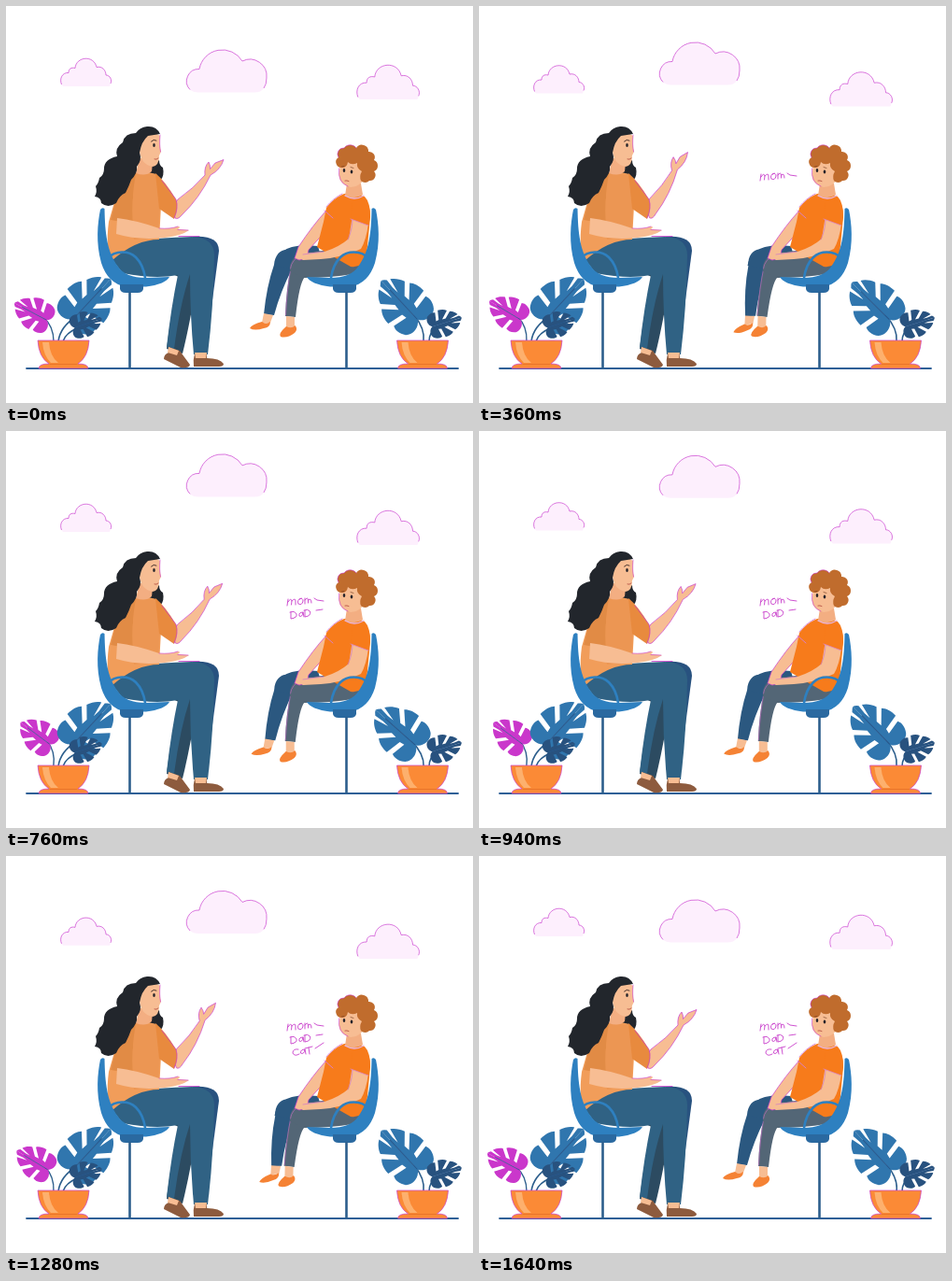
An HTML page that plays this animation: 500x425 px, repeating every 1.66 s.

```html
<!DOCTYPE html>
<html lang="en">
<head>
<meta charset="utf-8">
<title>Conversation</title>
<style>
html, body { margin: 0; width: 100%; height: 100%; overflow: hidden; background: #fff; }
svg { display: block; width: 100%; height: 100%; }
.edge { stroke: #cb3fd0; stroke-width: .7; vector-effect: non-scaling-stroke; }
.line { fill: none; stroke-linecap: round; stroke-linejoin: round; }
.ink { stroke: #c93fcb; stroke-width: .9; }
</style>
</head>
<body>
<svg id="stage" viewBox="0 0 500 425"></svg>
<script>
const LOOP = 1660;
const C = {
  skin: '#f7bd93', hair: '#22262c', curl: '#c06c2d', shirt: '#f19d5a', back: '#e18b45', panel: '#ec9653',
  sleeve: '#e88a3e', tee: '#f77b1b', jeans: '#306284', slate: '#2c4b61', navy: '#2b5880', grey: '#536676',
  chair: '#2e80c0', seat: '#2a69a0', pole: '#2c5e8c', leaf: '#3076ae', dark: '#28527f',
  pink: '#ca37cb', pot: '#fb8a36', glow: '#fdb06d', cloud: '#fdeffd', shoe: '#8d5b3e', foot: '#f58234'
};

const shape = (d, fill, cls = '') => `<path d="${d}" fill="${fill}" class="${cls}"/>`;
const line = (d, color, w = 1) => `<path d="${d}" class="line" stroke="${color}" stroke-width="${w}"/>`;
const dot = (x, y) => `<ellipse cx="${x}" cy="${y}" rx="1.300" ry="1.900" fill="#25242b"/>`;
const group = (id, body) => `<g id="${id}">${body}</g>`;
const place = (tf, body) => `<g transform="${tf}">${body}</g>`;

// --- scenery ---
const BIG = 'M197 89.5A13 13 0 0 1 207 67.500A25 25 0 0 1 253 59A18 18 0 0 1 279 77Q279 84 276 88';
const SMALL = 'M1.500 28C-1 22 2 15 9 15.500C9 11 12 9.500 16 10.500C17 -2 36 -4 39 9.500C45 8 49 13 49 18C53 18 56 23 54 27';
const bigCloud = shape(BIG + 'Q273 92.5 266 92.5H206Q200 92.5 197 89.5Z', C.cloud) + shape(BIG, 'none', 'edge');
const smallCloud = (x, y, s) => place(`translate(${x} ${y}) scale(${s})`,
  shape(SMALL + 'L53 30H3Z', C.cloud) + shape(SMALL, 'none', 'edge'));

const HALF = 'M0 2C8 16 28 18 38 8C46 -2 47 -14 43 -21L14 -16L16 -26L48 -32C48 -46 44 -56 38 -62L14 -38L13 -50L33 -71C29 -82 22 -90 15 -94L8 -64L7 -78L9 -97Q4 -103 0 -104Z';
const leaf = (x, y, angle, s, color) => place(`translate(${x} ${y}) rotate(${angle}) scale(${s})`,
  shape(HALF, color) + place('scale(-1 1)', shape(HALF, color)) + line('M0 0V-78', '#28568a', 1.8));

const pot = x => place(`translate(${x} 0)`,
  shape('M0 358H55Q54 376 43 383Q54 383 54 388H1Q1 383 12 383Q1 376 0 358Z', C.pot, 'edge') +
  shape('M5 360H12Q13 375 22 382H14Q6 374 5 360Z', C.glow) +
  line('M13 383.500H42', '#e9742a', 1));

const chair =
  shape('M101 218Q103 215 105.500 217C106 243 108 263 120 279Q128 291 150 291L175 290Q170 298 150 300.500H128Q109 297 102 275C96 253 98 233 101 218Z', C.chair) +
  shape('M122 298H147V303Q146 307 141 307H128Q123 307 122 303Z', C.seat) +
  line('M109 270C117 261 132 262 139 269Q147 277 149 291', C.chair, 2.6) +
  line('M132.500 307V387', C.pole, 2.6);

// --- woman ---
const forearm = shape('M181 227Q177 215 184 207Q201 195 213 181Q212 172 217 167Q219 171 218.500 174.500L224 168L233 164.500Q230 175 219 181Q207 206 188 224Q184 229 181 227Z', C.skin, 'edge');

const woman =
  shape('M154 171L164 165Q164 171 168 173Q170 182 165 187Q158 186 152 179Z', C.hair) +
  shape('M200 247Q228 245 228 262L219 330L208 352L196 300Z', C.dark) +
  shape('M150 275L200 280L205 290Q197 340 189 372L172 367Q178 320 185 290Z', C.slate) +
  shape('M128 252Q165 248 199 247Q223 248 223 267Q222 325 216 373H201Q197 330 197 287Q186 320 180 367L172 365Q177 321 184 288Q160 293 125 286L114 272Z', C.jeans) +
  line('M185 246.500H207', C.pink, .8) +
  shape('M174 365L186 369Q191 376 197 384Q196 388 187 387L169 378Q169 373 174 371Z', C.shoe) +
  shape('M174 365L185 369L183 374L173 371Z', C.skin) +
  shape('M202 372H215V377Q229 377 233 383Q233 386 228 386H201Q200 379 202 372Z', C.shoe) +
  shape('M202 371H215L214 377H203Z', C.skin) +
  shape('M124 182Q143 174 161 180L167 196L164 250Q139 250 114 272Q106 262 110 231Z', C.shirt) +
  shape('M124 182L140 179Q134 205 136 233L112 229Z', C.back) +
  shape('M139 179L161 180Q166 191 165 213L163 247L137 250Q133 210 139 179Z', C.panel) +
  shape('M160 179Q170 187 182 207Q185 216 180 228L164 217Z', C.sleeve) +
  line('M167 187L182 207Q185 216 180 227', C.pink, .7) +
  shape('M143 162L157 168L156 177Q150 183 139 179Z', '#f3ae82') +
  shape('M144 140Q158 133 165 139Q164 149 166 156L164 160Q164 171 157 172Q145 170 143 156Z', C.skin) +
  shape('M165 137Q161 128 151 129Q143 130 139 136Q127 136 125 146Q116 152 119 161Q105 164 105 174Q105 181 100 184Q99 190 96 193Q98 199 95 204Q102 205 102 211Q109 217 118 211Q121 203 128 200Q132 192 134 186Q141 179 140 172Q146 165 143 157Q145 145 152 139Z', C.hair) +
  line('M165 138Q164 149 165.500 156', C.pink, .6) +
  dot(158.5, 149) +
  line('M155.500 145Q158 142 161 144', '#3a2926', .9) +
  line('M159 164Q161 165 163 163', '#b75345', .9) +
  shape('M119 227Q138 229 164 238Q176 239 184 236Q188 236 184 239L196 240Q188 246 170 248Q141 251 118 244Z', C.skin) +
  line('M164 238Q176 239 184 236M184 239.500L195 240', C.pink, .6);

// --- boy ---
const backShin = shape('M287 277C288 262 300 257 308 264Q311 270 307 280Q294 305 287 331L276 330Q279 300 287 277Z', C.navy) +
  shape('M276 329L286 331L283 339H274Z', C.skin) +
  shape('M274 338Q278 341 283 338Q283 344 276 345Q266 348 261 345Q263 341 274 338Z', C.foot);
const frontShin = shape('M305 280Q309 267 325 272L320 290Q314 296 310 333L299 332Q300 302 305 280Z', C.grey) +
  line('M305 280Q301 302 299.500 331', '#b66cbc', .7) +
  shape('M300 332L309 333V345H300Z', C.skin) +
  shape('M300 343Q306 346 309.500 342Q313 346 309 350Q301 356 294 354Q291 351 300 343Z', C.foot);

const backThigh = shape('M334 257Q306 254 296 263Q289 269 287.500 278L305 281L340 278Z', C.navy);
const boy =
  shape('M340 262Q313 264 308 270Q303 276 304 284L319 291Q348 291 371 287L384 278Z', C.grey) +
  line('M304.500 281Q306 271 316 267', '#b66cbc', .7) +
  shape('M350 211L356 222Q343 242 324 261Q323 271 314 272L309 270L313 258Q329 234 342 220Z', C.skin, 'edge') +
  shape('M362 201Q375 199 384 204Q390 210 390 226L386 267Q382 281 369 279Q353 270 333 258L340 231L343 216Q350 206 362 201Z', C.tee) +
  line('M341 219L350 227M343 215Q350 206 360 201', '#d97fd3', .9) +
  shape('M371 224L388 232Q386 250 380 260Q362 269 337 271L318 272Q313 270 318 265L341 263Q357 258 367 249Z', C.skin) +
  line('M371 226Q371 240 366 250M318 266L340 263', '#ce7bc8', .7) +
  shape('M371 210Q384 204 389 215Q391 225 388 235L369 228Z', C.tee) +
  line('M369 228L388 235', '#dd86ca', .8) +
  shape('M365 190H380L382 202Q373 208 363 203Z', '#f3ae82') +
  line('M363 203Q373 209 383 203', '#e9b6df', 1.3) +
  shape('M358 168Q374 158 384 169L385 183Q379 194 369 194Q357 191 356.500 181Z', C.skin) +
  line('M356.500 174Q355 189 366 193', C.pink, .6) +
  shape('M360 173A6 6 0 0 1 356 162A6.500 6.500 0 0 1 362 152A8 8 0 0 1 375 152A7 7 0 0 1 388 156A6 6 0 0 1 394 165A6.500 6.500 0 0 1 394 177A6 6 0 0 1 389 187A6 6 0 0 1 380 187Q378 182 381 177Q375 174 376 168Q370 171 366 167Q365 173 360 173Z', C.curl) +
  line('M356 162A6.500 6.500 0 0 1 362 152A8 8 0 0 1 375 152', C.pink, .6) +
  dot(362, 176) + dot(370, 177.5) +
  line('M359.500 172L362 171.500M369 172.500L372 173.500', '#7a4428', .7) +
  line('M363 187Q365 186.500 367 187.500', '#b75345', .9);

// --- handwritten words ---
const word = (id, label, d) => `<g id="${id}" role="img" aria-label="${label}"><path class="line ink" d="${d}"/></g>`;
const words =
  word('w0', 'mom', 'M301 187L302 180M302 183Q305 178 306 182L305.500 186M306 182Q310 178 310 182V186M316 179Q311 181 313 185Q317 187 318 182Q318 178 314 180M320 185V179M320 181Q323 177 323.500 181V184M323.500 181Q327 178 327 184M330 179L333 181L340 182') +
  word('w1', 'DaD', 'M305 194V201Q312 200 311 196Q309 192 304 194M318 194Q313 194 314 198Q317 200 318 194L319 199M320 192V199Q327 198 325.500 193Q323 190 319 192M332 192L339 191') +
  word('w2', 'caT', 'M313 207Q307 206 307 211Q309 215 314 212M320 207Q315 207 315.500 211Q319 213 320 207L321 212M320 206L328 204M324 205L325 212M331 206L340 200');

const stage = document.getElementById('stage');
stage.innerHTML =
  group('mid', bigCloud) +
  group('side', smallCloud(58, 56, 1) + smallCloud(375, 63, 1.235)) +
  line('M22 388H484', '#2f6097', 1.8) +
  group('pinkLeaf', line('M51 359Q51 343 40 333', C.pole, 1.4) + leaf(43, 336, -62, .37, C.pink)) +
  line('M56 359Q58 343 76 332M61 359Q64 350 76 345', C.pole, 1.6) +
  leaf(73, 334, 43, .55, C.leaf) + leaf(74, 344, 72, .29, C.dark) + pot(34) +
  group('farLeaf', line('M447 359Q449 346 437 331', C.pole, 1.6) + leaf(440, 335, -43, .54, C.leaf)) +
  line('M453 359Q453 349 462 344', C.pole, 1.6) + leaf(457, 343, 73, .31, C.dark) + pot(418.5) +
  group('arm', forearm) + woman + chair +
  group('back', backShin) + backThigh + group('front', frontShin) + boy +
  place('matrix(-1 0 0 1 497 0)', chair) + words;

// --- motion: smooth periodic curves through [time, value] ---
const curve = pts => {
  const n = pts.length;
  const at = i => {
    const turn = Math.floor(i / n), p = pts[i - turn * n];
    return [p[0] + turn * LOOP, p[1]];
  };
  const slope = i => {
    const [a, b, c] = [at(i - 1), at(i), at(i + 1)];
    if ((b[1] - a[1]) * (c[1] - b[1]) <= 0) return 0;
    return (c[1] - a[1]) / (c[0] - a[0]);
  };
  return t => {
    let i = n - 1;
    while (i > 0 && pts[i][0] > t) i--;
    const [t0, a] = at(i), [t1, b] = at(i + 1), h = t1 - t0, u = (t - t0) / h;
    const v = 1 - u;
    return a * v * v * (1 + 2 * u) + b * u * u * (3 - 2 * u) + h * u * v * (slope(i) * v - slope(i + 1) * u);
  };
};

const rise = curve([[0, 0], [360, 8], [580, 15.5], [800, 22.5], [940, 20.7], [1140, 14.5], [1420, 5], [1650, 0]]);
const sink = curve([[0, 0], [360, 7.5], [580, 19.3], [760, 22], [940, 20.5], [1140, 14.5], [1420, 5.5], [1650, 0]]);
const swing = curve([[0, 0], [360, 1], [430, 1.05], [580, .76], [850, 0], [940, .1], [1140, 1], [1200, 1.05], [1420, .42], [1640, 0]]);
const sway = curve([[0, 0], [360, .35], [580, .82], [830, 1.05], [940, 1], [1140, .65], [1420, .17], [1640, 0]]);
const nod = curve([[0, 0], [360, .4], [580, 1], [680, 1.08], [940, .2], [1140, 0]]);

const part = id => document.getElementById(id);
const move = (id, y) => part(id).setAttribute('transform', `translate(0 ${y.toFixed(2)})`);
const turn = (id, a, x, y) => part(id).setAttribute('transform', `rotate(${a.toFixed(2)} ${x} ${y})`);
const START = [280, 660, 1040];

function draw(t) {
  const s = swing(t);
  move('mid', -rise(t));
  move('side', sink(t));
  turn('arm', -9.6 * s, 181, 217);
  turn('back', -8.2 * s, 297, 268);
  turn('front', 1.5 * s, 309, 276);
  turn('pinkLeaf', 8.5 * sway(t), 51, 358);
  turn('farLeaf', -6 * nod(t), 447, 358);
  START.forEach((at, i) => part('w' + i).setAttribute('visibility', t >= at ? 'visible' : 'hidden'));
}

const begin = performance.now();
function tick() {
  draw((performance.now() - begin) % LOOP);
  requestAnimationFrame(tick);
}
draw(0);
requestAnimationFrame(tick);
</script>
</body>
</html>
```
